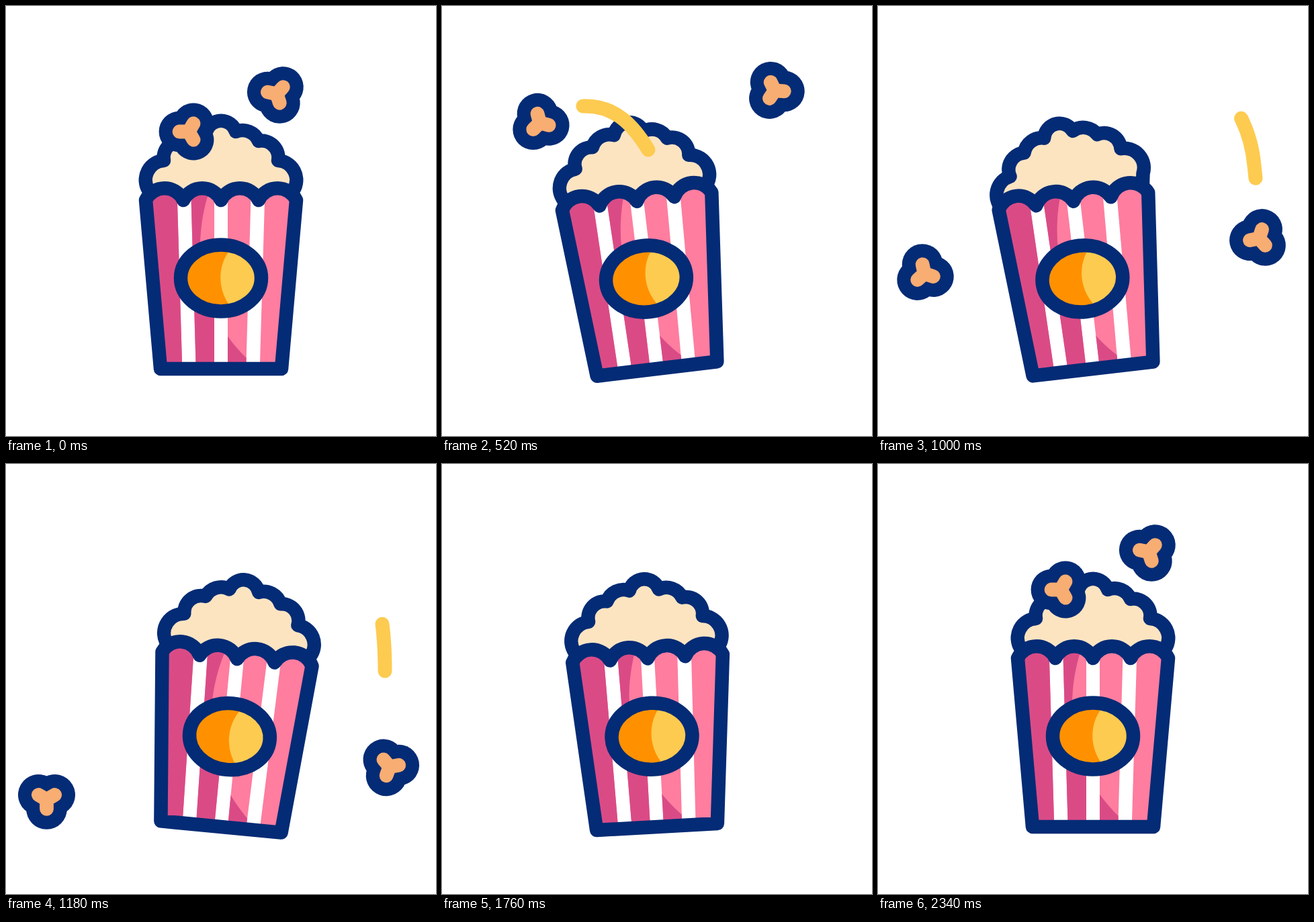
An HTML page that plays this animation: 640 by 640 pixels, repeating every 2.4 s.

```html
<!DOCTYPE html>
<html lang="en">
<head>
<meta charset="utf-8">
<title>Popcorn</title>
<style>
  html, body { margin: 0; width: 100%; height: 100%; overflow: hidden; background: #fff; }
  svg { display: block; width: 100vw; height: 100vh; }
  .line { stroke: #042b75; stroke-width: 20.5; stroke-linejoin: round; stroke-linecap: round; }
  .trail { fill: none; stroke: #fdcb50; stroke-width: 21; stroke-linecap: round; }
</style>
</head>
<body>
<svg viewBox="0 0 640 640">
  <defs>
    <path id="tub" d="M208 289A31 31 0 0 1 264 289A31 31 0 0 1 320 289A31 31 0 0 1 376 289A31 31 0 0 1 432 289L410 540H230Z"/>
    <clipPath id="inTub"><use href="#tub"/></clipPath>
    <clipPath id="shade"><path d="M190 240H312L301 280C275 365 290 460 360 526L375 545H190Z"/></clipPath>
    <path id="stripes" d="M190 250H253.8L262.3 540H190ZM274.5 250H310V540H282.7ZM330 250H365.5L357.3 540H330ZM386.2 250H450V540H377.7Z"/>
    <g id="kernel">
      <g fill="#042b75">
        <circle cx="14" r="30.4"/>
        <circle cx="14" r="30.4" transform="rotate(120)"/>
        <circle cx="14" r="30.4" transform="rotate(240)"/>
      </g>
      <path d="M0 0H14M0 0L-7 12.1M0 0L-7 -12.1" stroke="#f8ad72" stroke-width="20.8" stroke-linecap="round"/>
    </g>
    <path id="flightL" d="M272 187C250 160 185 138 146.5 173C118 199 98 250 85 306C72 362 64 430 60.5 498L60 524C58 455 42 415 15 435C-5 443 -40 460 -60 490"/>
    <path id="flightR" d="M403 131C425 118 462 114 493 125C537 141 553 193 561 246C567 305 568 380 570.5 446L577 524C579 475 583 443 590.5 471C605 495 640 510 700 520"/>
  </defs>

  <g id="bucket">
    <path id="heap" class="line" fill="#fde4c1" d="M212 274A29 29 0 0 1 235 230A25 25 0 0 1 264 201A26 26 0 0 1 298 187A23 23 0 0 1 342 187A26 26 0 0 1 376 201A25 25 0 0 1 405 230A29 29 0 0 1 428 274L412 330H228Z"/>
    <g clip-path="url(#inTub)">
      <rect x="190" y="240" width="260" height="310" fill="#fff"/>
      <use href="#stripes" fill="#ff7d9f"/>
      <g clip-path="url(#shade)"><use href="#stripes" fill="#da4b86"/></g>
    </g>
    <use href="#tub" class="line" fill="none"/>
    <ellipse cx="320" cy="405" rx="60" ry="49.5" fill="#ff9100"/>
    <path d="M338 357.8C313 383 313 425 338 452.2A60 49.5 0 0 0 338 357.8Z" fill="#fdcb50"/>
    <ellipse class="line" cx="320" cy="405" rx="60" ry="49.5" fill="none"/>
  </g>

  <path id="trailL" class="trail" pathLength="1" d="M307 214C285 178 258 147 209 149C190 150 175 157 164 163"/>
  <path id="trailR" class="trail" pathLength="1" d="M482 131C510 128 528 142 540 166C552 190 558 214 560 238C563 262 564 285 564 308"/>
  <use id="popL" href="#kernel"/>
  <use id="popR" href="#kernel"/>
</svg>
<script>
const LOOP = 2400, REGROW = 1960, GROWN = 2320;
const $ = id => document.getElementById(id);
const ramp = (a, b, t) => Math.min(1, Math.max(0, (t - a) / (b - a)));
const smooth = u => u * u * (3 - 2 * u);
const linear = u => u;

// Adds up the steps between [time, value] keys
const follow = (keys, t, ease = smooth) => keys.slice(1).reduce(
  (v, [end, to], i) => v + (to - keys[i][1]) * ease(ramp(keys[i][0], end, t)), keys[0][1]);

// Turning points of the bucket and of the heap inside it
const tilt = [[200, 0], [850, -14], [1215, 6], [1915, -4.5], [2260, 0]];
const slosh = [[500, 0], [800, -12], [1420, 6.5], [1980, -3], [2340, 0]];

const kernels = [
  { el: $('popL'), path: $('flightL'), start: 120, pace: 0.0694,
    turn: [[120, 60], [520, 15], [820, -54], [1420, -214]] },
  { el: $('popR'), path: $('flightR'), start: 240, pace: 0.0743,
    turn: [[240, -48], [520, 4], [1180, 230], [1420, 280]] }
];

const trails = [
  { el: $('trailL'), head: [290, 610], tail: [520, 822] },
  { el: $('trailR'), head: [680, 1100], tail: [820, 1350] }
];

// Each kernel picks up speed along its path, then grows back in its first place
function drawKernel({ el, path, start, pace, turn }, t) {
  const back = t >= REGROW;
  const time = back ? 0 : t;
  const { x, y } = path.getPointAtLength(pace * Math.max(0, time - start) ** 1.27);
  const size = back ? smooth(ramp(REGROW, GROWN, t)) : 1;
  el.setAttribute('transform',
    `translate(${x} ${y}) rotate(${follow(turn, time, linear)}) scale(${size})`);
}

function drawTrail({ el, head, tail }, t) {
  const h = ramp(...head, t), q = ramp(...tail, t);
  el.style.display = h > q ? '' : 'none';
  el.setAttribute('stroke-dasharray', `${h - q} 2`);
  el.setAttribute('stroke-dashoffset', -q);
}

function draw(t) {
  $('bucket').setAttribute('transform', `rotate(${follow(tilt, t)} 320 540)`);
  $('heap').setAttribute('transform', `rotate(${follow(slosh, t)} 320 270)`);
  kernels.forEach(k => drawKernel(k, t));
  trails.forEach(k => drawTrail(k, t));
}

let start;
function frame(now) {
  start ??= now;
  draw((now - start) % LOOP);
  requestAnimationFrame(frame);
}
draw(0);
requestAnimationFrame(frame);
</script>
</body>
</html>
```
